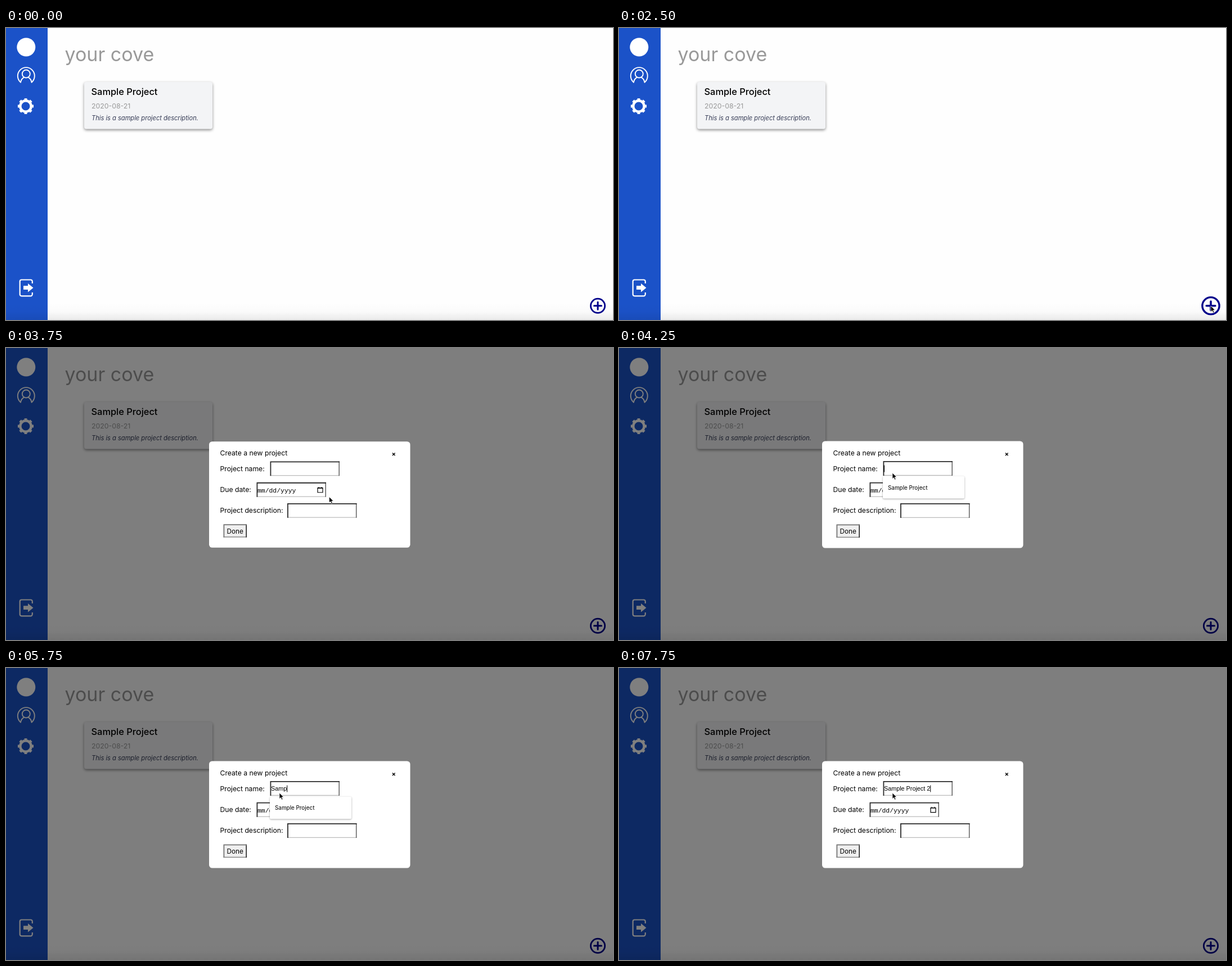
These frames come from a looping animation (1079 px wide and 519 px high, 8 s). An HTML page:

```html
<!DOCTYPE html>
<html lang="en">
<head>
<meta charset="utf-8">
<title>Project board</title>
<style>
  html, body { margin: 0; width: 100%; height: 100%; overflow: hidden; background: #fefefe; }
  svg { display: block; width: 100vw; height: 100vh; }
  text { font-family: Inter, "Open Sans", sans-serif; font-optical-sizing: none; white-space: pre; }
  .line { fill: none; stroke: #fff; }
  .label { font-size: 12.2px; }
  .card { fill: #f3f4f6; filter: drop-shadow(0 2px 2.5px rgba(0, 0, 0, .45)); }
  .popup { fill: #fff; filter: drop-shadow(0 1px 1.5px rgba(0, 0, 0, .35)); }
</style>
</head>
<body>
<svg viewBox="0 0 1079 519">
  <defs>
    <linearGradient id="fade" x1="0" y1="0" x2="0" y2="1">
      <stop offset="0" stop-color="#000" stop-opacity="0"/>
      <stop offset=".5" stop-color="#000" stop-opacity=".015"/>
      <stop offset="1" stop-color="#000" stop-opacity=".08"/>
    </linearGradient>
  </defs>

  <rect width="1079" height="519" fill="#fefefe"/>
  <rect width="74" height="519" fill="#1b52c8"/>
  <rect y="489" width="1079" height="30" fill="url(#fade)"/>

  <!-- sidebar -->
  <circle cx="35.8" cy="34" r="16.5" fill="#fff"/>
  <g class="line" stroke-width="1.9" stroke-linecap="round">
    <path d="M26 96.5A15 15 0 1 1 45.6 96.5"/>
    <circle cx="35.8" cy="81.5" r="7"/>
    <path d="M26 96.5C27 91.5 29.5 89 32 87.6M45.6 96.5C44.6 91.5 42 89 39.6 87.6"/>
  </g>
  <g class="line">
    <circle cx="35" cy="139" r="9.7" stroke-width="4.4"/>
    <circle id="teeth" cx="35" cy="139" r="12.4" stroke-width="3.4" pathLength="16" stroke-dasharray="1" stroke-dashoffset=".5"/>
  </g>
  <path class="line" stroke-width="2.2" d="M46.8 454V450.500a3 3 0 0 0-3-3H27.700a3 3 0 0 0-3 3V473.300a3 3 0 0 0 3 3H43.800a3 3 0 0 0 3-3V470"/>
  <path fill="#fff" d="M31 458.300h8V454l9.500 7.700-9.500 7.700v-4.300h-8z"/>

  <!-- board -->
  <text x="104.500" y="59" font-size="34" fill="#999">your cove</text>
  <rect class="card" x="139" y="96" width="228" height="83.500" rx="4"/>
  <text x="151.500" y="118.500" font-size="16.400" font-weight="500">Sample Project</text>
  <text x="152" y="142.500" font-size="12.300" fill="#999">2020-08-21</text>
  <text x="152" y="163.700" font-size="11.100" font-style="italic" fill="#343a54">This is a sample project description.</text>

  <g id="add" fill="none" stroke="#00008b" stroke-width="2.800">
    <circle r="12.600"/>
    <path d="M-6.500 0H6.500M0-6.500V6.500" stroke-width="3" stroke-linecap="round"/>
  </g>

  <!-- dialog -->
  <g id="dialog">
    <rect width="1079" height="519" opacity=".5"/>
    <g id="panel">
      <rect x="361" y="165.500" width="357.500" height="190" rx="5.500" fill="#fff"/>
      <text class="label" x="380.500" y="191">Create a new project</text>
      <text x="685.500" y="192" font-size="11" font-weight="700">×</text>
      <text class="label" x="380.500" y="218.500">Project name:</text>
      <text class="label" x="380.500" y="256">Due date:</text>
      <text class="label" x="380.500" y="293">Project description:</text>
      <g id="boxes"></g>
      <text x="447" y="256.500" style="font:11.4px 'Liberation Mono',monospace">mm/dd/yyyy</text>
      <path d="M554 248.500h9v8.200h-9zM553.500 249h10M556 246.800v2M561 246.800v2" fill="none" stroke="#000" stroke-width="1.200"/>
      <text x="392.500" y="330" font-size="11.800">Done</text>
      <text id="typed" x="471" y="218" style="font:10.8px 'Liberation Sans',Arial,sans-serif"></text>
      <rect id="caret" y="208.500" width="1" height="12"/>
    </g>
    <g id="popup">
      <rect class="popup" x="469" y="228" width="145" height="39.500" rx="2"/>
      <text x="478" y="251.500" font-size="9.800" font-weight="500" fill="#222">Sample Project</text>
    </g>
  </g>

  <path id="cursor" d="M0 0V10.500L2.500 8.300 4.200 12.200 6 11.400 4.300 7.600H7.600Z" fill="#000" stroke="#fff" stroke-width=".7"/>
</svg>
<script>
const LOOP = 8000, STEP = 250;
const el = id => document.getElementById(id);
const show = (id, on) => el(id).setAttribute("display", on ? "inline" : "none");

// Bevelled box: dark or light edges on the top-left and bottom-right.
function bevel(x, y, w, h, fill, topLeft, right, bottom) {
  const edge = (d, color, width) => `<path d="${d}" fill="none" stroke="${color}" stroke-width="${width}"/>`;
  return `<rect x="${x}" y="${y}" width="${w}" height="${h}" fill="${fill}"/>` +
    edge(`M${x} ${y + h - .6}h${w}`, bottom, 1.2) +
    edge(`M${x + w - .8} ${y}v${h}`, right, 1.6) +
    edge(`M${x + .9} ${y + h}V${y + .9}H${x + w}`, topLeft, 1.8);
}
const field = (x, y) => bevel(x, y, 123.5, 26, "#fff", "#2b2b2b", "#666", "#bbb");
el("boxes").innerHTML = field(469.5, 201) + field(445.5, 238.7) + field(500, 276) +
  bevel(386.5, 313.5, 41.5, 23.5, "#efefef", "#777", "#222", "#777");

// Pointer stops as [time, x, y].
const stops = [
  [750, 1016, 48], [1000, 1072, 267], [1250, 1076, 447], [1500, 1061, 474],
  [1750, 1052, 489], [2000, 1052, 494], [3000, 1052, 494], [4000, 486, 222]
];
const ease = p => p * p * (3 - 2 * p);

function pointerAt(t) {
  const next = stops.findIndex(s => s[0] > t);
  if (next < 0) return stops[stops.length - 1].slice(1);
  const a = stops[next - 1], b = stops[next];
  const p = ease((t - a[0]) / (b[0] - a[0]));
  return [a[1] + (b[1] - a[1]) * p, a[2] + (b[2] - a[2]) * p];
}

// Letters present after each keystroke step, starting at 5000 ms.
const name = "Sample Project 2";
const counts = [1, 2, 3, 4, 5, 7, 8, 10, 11, 14, 15, 16];
const lettersAt = t => t < 5000 ? 0 : counts[Math.min(counts.length - 1, (t - 5000) / STEP)];

function draw(time) {
  const t = Math.floor(time % LOOP / STEP) * STEP;
  const letters = lettersAt(t);

  show("cursor", t >= 750);
  if (t >= 750) el("cursor").setAttribute("transform", `translate(${pointerAt(t)})`);

  const hover = t < 2000 || t >= 3000 ? 0 : t < 2250 ? .5 : 1;
  el("add").setAttribute("transform", `translate(1052 493.8) scale(${1 + .2 * hover})`);

  show("dialog", t >= 3000);
  const squash = t < 4250 ? .993 : 1;
  el("panel").setAttribute("transform", `translate(0 ${260.5 * (1 - squash)}) scale(1 ${squash})`);

  show("popup", t >= 4250 && letters < 14);
  el("popup").setAttribute("transform", `translate(0 ${t < 4500 ? 0 : .8})`);

  el("typed").textContent = name.slice(0, letters);
  show("caret", t >= 4250);
  el("caret").setAttribute("x", 471 + (letters ? el("typed").getComputedTextLength() : 0));
}

const start = performance.now();
function tick() {
  draw(performance.now() - start);
  requestAnimationFrame(tick);
}
tick();
</script>
</body>
</html>
```
